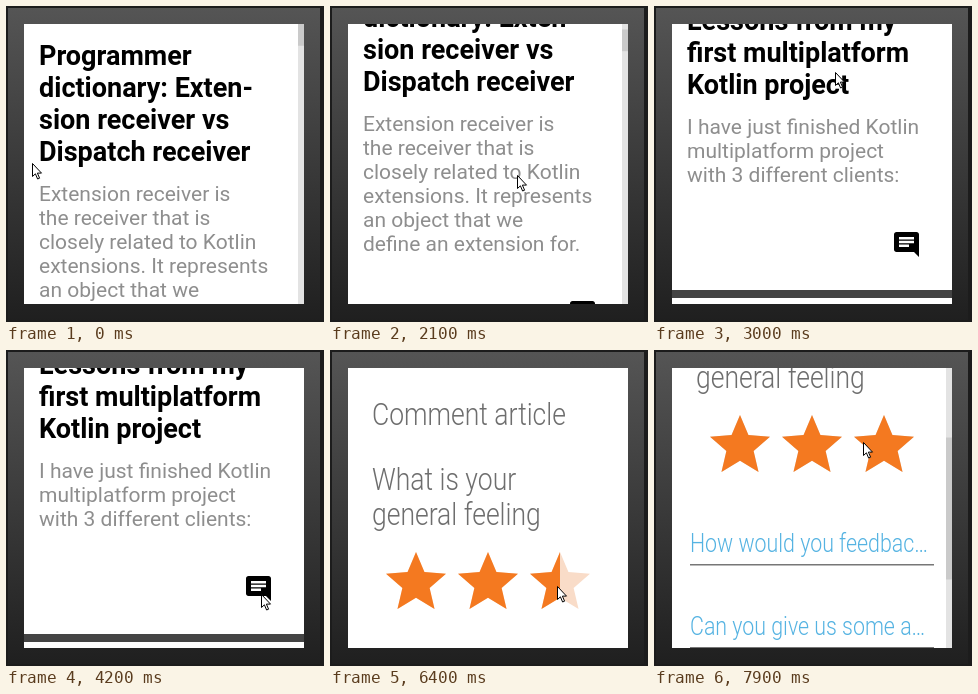
Animation of 318x316 px, one loop 8 s. Source, as an HTML page with a canvas:

```html
<!DOCTYPE html>
<html lang="en">
<head>
<meta charset="utf-8">
<title>Reader app</title>
<style>
  html, body { margin: 0; width: 100%; height: 100%; overflow: hidden; background: #1c1c1c; }
  canvas { display: block; }
</style>
</head>
<body>
<canvas width="318" height="316"></canvas>
<script>
const ctx = document.querySelector('canvas').getContext('2d');
const LOOP = 8000, STEP = 100, REST = 100, CONDENSED = 0.855;
const EDGE = 18, SIZE = 280;
const STAR = new Path2D('M12 17.27 18.18 21 16.54 13.97 22 9.24 14.81 8.63 12 2 9.19 8.63 2 9.24 7.46 13.97 5.82 21z');
const MESSAGE = new Path2D('M22 4c0-1.1-.9-2-2-2H4c-1.1 0-2 .9-2 2v12c0 1.1.9 2 2 2h14l4 4zM14 14H6v-2h8zm4-3H6V9h12zm0-3H6V6h12z');
const ARROW = new Path2D('M.5.5V13.5L3.4 10.8 5.6 16 7.6 15.2 5.4 10.1H9.5z');

// Where the hand comes to rest: [time, x, y]
const rests = [
  [-REST, 27, 157], [900, 106, 128], [1700, 167, 267], [2500, 198, 122], [3000, 182, 66],
  [4100, 256, 244], [4900, 158, 165], [5300, 217, 228], [5700, 77, 232], [5900, 112, 232],
  [6400, 228, 236], [6600, 244, 228], [7000, 252, 237], [7900, 210, 92]
];

const clamp = (v, lo, hi) => Math.min(hi, Math.max(lo, v));
const ramp = (t, from, to) => clamp((t - from) / (to - from), 0, 1);
const easeOut = p => 1 - (1 - p) ** 2;
const easeInOut = p => (1 - Math.cos(Math.PI * p)) / 2;

// The hand pauses at each rest, then moves on and slows into the next one
function cursorAt(t) {
  const i = Math.max(1, rests.findIndex(r => r[0] >= t));
  const [t0, x0, y0] = rests[i - 1], [t1, x1, y1] = rests[i];
  const p = easeOut(ramp(t, t0 + REST, t1));
  return [x0 + (x1 - x0) * p, y0 + (y1 - y0) * p];
}

function box(color, x, y, w, h) {
  ctx.fillStyle = color;
  ctx.fillRect(x, y, w, h);
}

function lines(texts, font, color, x, y, lineHeight, scaleX = 1) {
  ctx.save();
  ctx.translate(x, 0);
  ctx.scale(scaleX, 1);
  ctx.font = font + ' Roboto, sans-serif';
  ctx.fillStyle = color;
  texts.forEach((s, i) => ctx.fillText(s, 0, y + i * lineHeight));
  ctx.restore();
}

function icon(path, color, x, y, scale) {
  ctx.save();
  ctx.translate(x, y);
  ctx.scale(scale, scale);
  ctx.fillStyle = color;
  ctx.fill(path, 'evenodd');
  ctx.restore();
}

// Draws one article card and returns the top of the next one
function card(top, title, body) {
  const bodyY = top + 41 + title.length * 32 + 8;
  const bottom = bodyY + (body.length - 1) * 24 + 108;
  box('#fff', EDGE, top, SIZE, bottom - top);
  lines(title, 'bold 27px', '#000', 33, top + 41, 32);
  lines(body, '21px', '#8e8e8e', 33, bodyY, 24);
  icon(MESSAGE, '#000', 237.5, bottom - 60.5, 1.25);
  return bottom + 8;
}

function scrollbar(scroll, height) {
  const ratio = SIZE / height;
  box('rgba(0,0,0,.11)', 292, EDGE, 6, SIZE);
  box('rgba(0,0,0,.11)', 292, EDGE + scroll * ratio, 6, SIZE * ratio);
}

function spinner(t) {
  const pull = ramp(t, 1000, 1500), scale = 1 - ramp(t, 1700, 1900);
  if (!pull || !scale) return;
  ctx.save();
  ctx.translate(158, 84 * easeOut(pull));
  ctx.scale(scale, scale);
  ctx.shadowColor = 'rgba(0,0,0,.3)';
  ctx.shadowBlur = 4;
  ctx.shadowOffsetY = 1;
  ctx.fillStyle = '#fafafa';
  ctx.beginPath();
  ctx.arc(0, 0, 12.5, 0, 7);
  ctx.fill();
  ctx.shadowColor = 'transparent';
  ctx.strokeStyle = '#222';
  ctx.lineWidth = 1.6;
  ctx.beginPath();
  ctx.arc(0, 0, 5, 2.4, 2.4 + 1.4 * pull);
  ctx.stroke();
  ctx.restore();
}

function articles(t) {
  const scroll = Math.round(448 * easeInOut(ramp(t, 1800, 2960)));
  box('#444', EDGE, EDGE, SIZE, SIZE);
  let top = card(EDGE - scroll,
    ['Programmer', 'dictionary: Exten-', 'sion receiver vs', 'Dispatch receiver'],
    ['Extension receiver is', 'the receiver that is', 'closely related to Kotlin',
      'extensions. It represents', 'an object that we', 'define an extension for.']);
  top = card(top,
    ['Lessons from my', 'first multiplatform', 'Kotlin project'],
    ['I have just finished Kotlin', 'multiplatform project', 'with 3 different clients:']);
  box('#fff', EDGE, top, SIZE, SIZE);
  if (t < 900 || t >= 1900 && t < 3000) scrollbar(scroll, 3600);
  spinner(t);
}

function stars(t, x, y) {
  const pressed = t >= 5500 && t < 6600;
  const rating = pressed ? clamp(Math.ceil((x - 50) / 36) / 2, 0, 3) : t < 5500 ? 2.5 : 3;
  const row = color => {
    for (let i = 0; i < 3; i++) icon(STAR, color, 50 + 72 * i, y, 3);
  };
  row(pressed ? '#f9dcc8' : '#dcdcdc');
  ctx.save();
  ctx.beginPath();
  ctx.rect(50, y, 72 * rating, 72);
  ctx.clip();
  row('#f47920');
  ctx.restore();
}

function commentForm(t, [x, y]) {
  // The page follows the finger once it has moved 8px
  const scroll = t < 7100 ? 0 : Math.max(0, Math.round(229 - y));
  box('#fff', EDGE, EDGE, SIZE, SIZE);
  ctx.save();
  ctx.translate(0, -scroll);
  lines(['Comment article'], '300 31px', '#6e6e6e', 42, 74.5, 0, CONDENSED);
  lines(['What is your', 'general feeling'], '300 31px', '#6e6e6e', 42, 139.5, 35, CONDENSED);
  stars(t, x, 196);
  lines(['How would you feedbac…', 'Can you give us some a…'], '300 25px', '#55b3e2', 36, 339, 83, CONDENSED);
  for (const lineY of [351, 434]) box('#777', 36, lineY, 244, 1.5);
  ctx.restore();
  if (t < 5000 || t >= 7200) scrollbar(scroll, 552);
}

function bezel() {
  const shade = ctx.createLinearGradient(0, 0, 0, 316);
  shade.addColorStop(0, '#555');
  shade.addColorStop(1, '#1f1f1f');
  box('#1c1c1c', 0, 0, 318, 316);
  box(shade, 2, 2, 312, 312);
}

function draw(now) {
  const t = Math.floor(now % LOOP / STEP) * STEP;
  const cursor = cursorAt(t);
  bezel();
  ctx.save();
  ctx.beginPath();
  ctx.rect(EDGE, EDGE, SIZE, SIZE);
  ctx.clip();
  const opened = ramp(t, 4300, 4700);
  if (opened < 1) articles(t);
  if (opened > 0) {
    ctx.globalAlpha = opened;
    ctx.translate(0, 24 * (1 - easeOut(opened)));
    commentForm(t, cursor);
  }
  ctx.restore();

  ctx.save();
  ctx.translate(Math.round(cursor[0]) - 1, Math.round(cursor[1]));
  ctx.fillStyle = '#fff';
  ctx.strokeStyle = '#000';
  ctx.fill(ARROW);
  ctx.stroke(ARROW);
  ctx.restore();
}

const start = performance.now();
function tick() {
  draw(performance.now() - start);
  requestAnimationFrame(tick);
}
tick();
</script>
</body>
</html>
```
